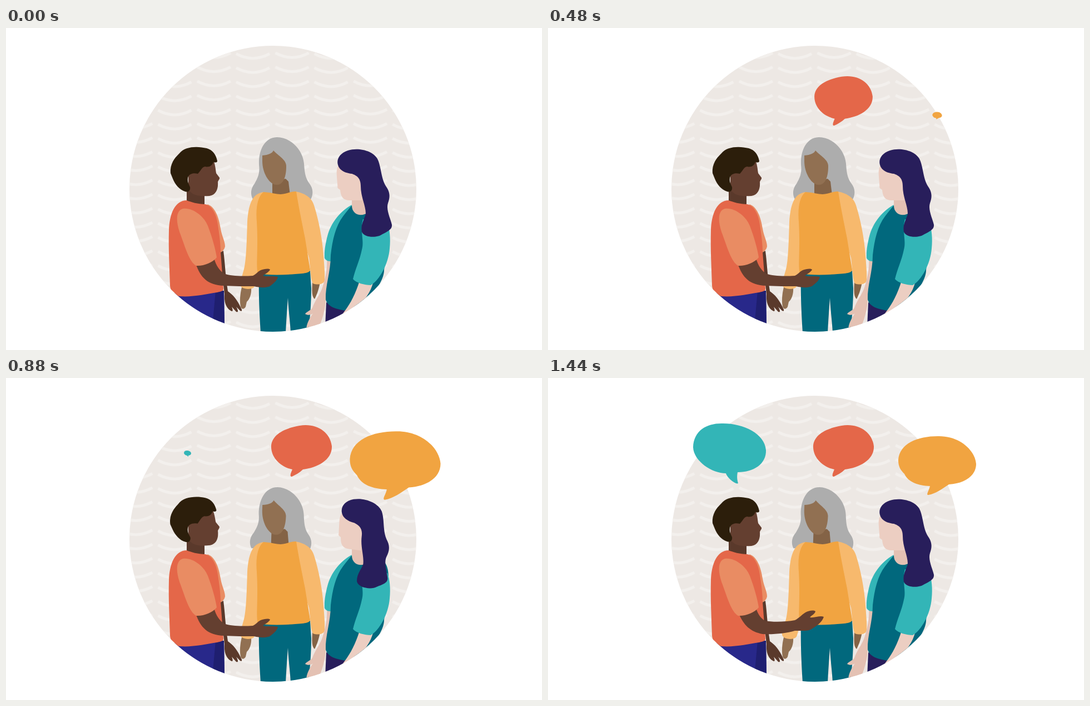
Animation, 964 px wide and 581 px high, one loop 6440 ms. Source, as an HTML page:

```html
<!DOCTYPE html>
<html lang="en">
<head>
<meta charset="utf-8">
<title>Conversation</title>
<style>
  html, body { margin: 0; width: 100%; height: 100%; overflow: hidden; background: #fff; }
  svg { display: block; width: 100%; height: 100%; }
  .red { fill: #e46749; }
  .peach { fill: #e98c63; }
  .amber { fill: #f1a441; }
  .light-amber { fill: #f7b96d; }
  .teal { fill: #33b5b7; }
  .petrol { fill: #01687d; }
  .navy { fill: #281e5b; }
  .brown { fill: #643f30; }
  .dark-brown { fill: #5a392b; }
  .tan { fill: #917052; }
  .dark-tan { fill: #846346; }
  .pink { fill: #eccec2; }
  .dark-pink { fill: #e4c1b3; }
</style>
</head>
<body>
<svg viewBox="0 0 964 581">
  <defs>
    <clipPath id="disc"><circle cx="480" cy="290" r="258"/></clipPath>
    <pattern id="waves" x="408.5" y="41" width="140.6" height="25.5" patternUnits="userSpaceOnUse">
      <g fill="none" stroke="#f3f0ed" stroke-width="5">
        <path d="M5.5 5.500Q35.500 22 65.500 5.500"/>
        <path d="M76 4Q106 20.500 136 4"/>
      </g>
    </pattern>
  </defs>

  <g clip-path="url(#disc)">
    <rect width="964" height="581" fill="#ede8e4"/>
    <rect width="964" height="581" fill="url(#waves)"/>

    <g id="middle-woman">
      <path class="tan" d="M424 468H441C442 480 438 490 433 494L431 503C428 508 424 508 422 503C420 492 421 480 424 468Z"/>
      <path class="dark-tan" d="M551 458H565C562 475 558 483 555 489C550 485 550 475 551 458Z"/>
      <path class="petrol" d="M455 438H547L549 470C549 500 546 530 544 550H512C511 530 508 510 507 487C506 500 504 530 503 550H458C456 520 454 480 455 438Z"/>
      <g id="middle-head">
        <path fill="#adadad" d="M487 197C512 197 534 220 536 245C537 262 539 272 546 281C553 290 553 302 547 311L500 306L444 309C438 298 442 287 447 281C453 270 457 262 455 247C454 222 464 198 487 197Z"/>
        <path class="dark-tan" d="M479 276L503 272L508 277L511 302H479Z"/>
        <path class="tan" d="M461 230C472 229 479 226 481 221C490 231 505 238 504 250C504 268 499 283 487 283C474 283 461 262 461 240Z"/>
      </g>
      <path class="light-amber" d="M464 296C442 298 436 320 434 350C433 385 432 420 428 435L421 460C420 466 424 470 435 471C444 471 447 468 448 464L458 430L465 320Z"/>
      <path class="light-amber" d="M520 295C535 297 550 305 554 320C562 345 569 380 571 410C572 425 574 445 573 456C571 463 560 464 552 461C548 455 548 440 545 415L515 320Z"/>
      <path class="amber" d="M463 296C480 297 485 300 494 300C505 300 512 294 522 295C525 315 531 345 538 380L547 436C547 441 540 443 520 444C495 446 470 446 453 443C449 430 454 400 451 350C449 325 452 305 463 296Z"/>
    </g>

    <g id="man">
      <path class="dark-brown" d="M384 405L391 402C394 425 395 450 398 468L399 475C408 481 416 490 424 508C425 512 421 511 419 508L414 503C417 508 419 514 414 512L406 503C408 508 409 513 404 510C396 505 392 495 393 480Z"/>
      <path fill="#28288a" d="M300 478L392 474L393 540H300Z"/>
      <path fill="#1f1f70" d="M377 474H392L393 540H371Z"/>
      <path class="dark-brown" d="M325 285H357V322H325Z"/>
      <path class="peach" d="M362 318C376 322 383 342 386 362C388 375 394 385 394 394C393 400 389 403 386 405L370 350Z"/>
      <path class="red" d="M325 311C332 314 346 318 358 318C371 320 379 338 381 355C384 375 386 390 386 404L391 470C392 474 388 475 380 477C360 480 335 486 312 484C300 482 296 474 295 465C294 430 292 400 293 365C294 335 304 311 325 311Z"/>
      <g id="man-head">
        <path class="brown" d="M328 262L345 248L374 241C377 250 377 257 378 262L384 270C385 273 381 275 381 278C382 290 378 301 366 303C350 304 333 303 328 290Z"/>
        <path fill="#2c1e0b" d="M296 262C294 243 307 231 312 226C322 213 345 213 361 217C372 220 378 229 380 240C380 243 376 243 373 242C371 248 366 252 358 250C352 251 350 258 345 263C337 261 328 263 327 271C326 278 329 282 331 287C332 294 327 297 322 295C312 292 304 282 300 272Z"/>
      </g>
      <path id="arm" class="brown"/>
      <path class="peach" d="M318 326C335 323 357 340 363 357C371 378 377 400 379 414C372 423 355 430 342 429C330 422 323 398 314 373C306 352 304 330 318 326Z"/>
    </g>

    <g id="right-woman">
      <path class="dark-pink" d="M577 415H587C584 440 577 460 575 490C574 510 568 530 560 545L540 545C540 535 545 525 552 515C548 518 543 519 538 516C540 512 548 510 551 505C555 492 566 480 570 465C574 450 578 440 577 415Z"/>
      <path class="navy" d="M576 495L614 505L590 540H574Z"/>
      <path class="teal" d="M622 319C608 326 587 345 579 372C574 390 572 405 573 415C575 420 580 421 586 421L606 370Z"/>
      <path class="dark-pink" d="M622 300H648V342H622Z"/>
      <path class="petrol" d="M622 320C622 335 635 340 645 336L670 325C685 330 688 345 688 360L680 437C680 450 670 470 650 490L612 510C595 508 578 503 575 490C574 465 584 440 584 410C587 382 593 357 606 340C612 332 617 326 622 320Z"/>
      <path class="pink" d="M636 456L660 460C655 480 640 500 606 528L600 522C614 506 626 488 636 456Z"/>
      <path class="teal" d="M642 345C636 365 645 385 640 400C636 420 628 435 624 453C630 460 645 464 656 464C672 455 688 425 690 398C692 380 690 362 686 352Z"/>
      <g id="right-head">
        <path class="pink" d="M600 246C595 250 594 258 595 268L596 282C597 285 595 288 598 290L601 292C602 305 607 311 618 311H641V250Z"/>
        <path class="navy" d="M597 247C594 237 600 226 615 221C635 215 660 222 668 236C675 250 674 270 683 285C691 296 691 305 687 316C683 328 692 345 694 355C695 364 684 368 677 372C668 379 645 379 640 368C637 355 645 345 647 335C647 320 638 305 638 285C638 270 630 266 622 263C612 262 600 258 597 247Z"/>
      </g>
    </g>
  </g>

  <path id="red-bubble" class="red" d="M477 122C479 102 500 91 528 86C558 81 583 97 586 123C587 148 560 162 534 165C528 171 520 175 514 178C509 178 513 170 515 165C492 160 476 142 477 122Z"/>
  <path id="amber-bubble" class="amber" d="M630 148C632 118 665 105 701 105C740 104 768 130 770 155C770 176 750 190 721 192C709 200 697 209 684 211C679 211 686 202 687 195C665 194 648 188 641 173C634 166 630 160 630 148Z"/>
  <path id="teal-bubble" class="teal" d="M261 125C262 95 285 82 312 82C350 81 390 100 392 130C393 155 370 170 341 170C339 180 341 186 342 190C338 193 322 180 320 172C295 172 262 150 261 125Z"/>
</svg>
<script>
const STEP = 80, LOOP = 6440, LAST_STEP = 18;
const el = id => document.getElementById(id);

// Linear interpolation through [step, value] keys, held at both ends.
function track(keys, x) {
  if (x <= keys[0][0]) return keys[0][1];
  for (let i = 1; i < keys.length; i++) {
    const [x0, a] = keys[i - 1], [x1, b] = keys[i];
    if (x <= x1) return a + (b - a) * (x - x0) / (x1 - x0);
  }
  return keys[keys.length - 1][1];
}

const pop = [[1, 0], [1.7, .09], [3.7, .31], [4, .39], [5, .61], [6, .96], [7, 1.165], [8, 1.12], [9, 1]];
const bubbles = [
  { id: 'red-bubble', delay: 0, x: 531.5, y: 131, rest: 1 },
  { id: 'amber-bubble', delay: 4, x: 700, y: 158, rest: 1 },
  { id: 'teal-bubble', delay: 9.2, x: 326.5, y: 136.5, rest: 1.024 }
];
const heads = [
  { id: 'man-head', pivot: '340 276', keys: [[9, 0], [11, -2.5], [13, -8], [15, -2.5], [17, 0]] },
  { id: 'middle-head', pivot: '490 235', keys: [[8, 0], [10, 2]] },
  { id: 'right-head', pivot: '637 299', keys: [[6, 0], [8, 3.8], [11, 7.3], [13, 3.8], [15, 0]] }
];

const armLow = 'M341 425C350 450 362 464 392 465C410 466 430 466 446 466C458 469 470 469 476 465C482 460 488 455 489 449C482 447 470 449 462 447C466 444 473 440 475 436C472 433 464 435 458 437C452 440 449 445 444 447C425 448 405 448 392 443C385 438 378 430 374 415Z';
const armHigh = 'M343 425C352 446 364 458 386 462C405 463 428 461 444 456C456 456 468 457 474 453C482 448 493 441 496 431C490 428 480 433 471 432C474 428 480 426 481 421C477 418 469 420 463 423C456 427 451 434 444 437C428 440 405 441 390 438C384 434 378 428 374 415Z';
const armKeys = [[11, 0], [13, .75], [15, 1]];

function blend(from, to, p) {
  const ends = to.match(/\d+/g);
  let i = 0;
  return from.replace(/\d+/g, n => +n + (ends[i++] - n) * p);
}

function draw(step) {
  for (const { id, delay, x, y, rest } of bubbles) {
    const s = track(pop, step - delay) / rest;
    el(id).setAttribute('transform', `translate(${x} ${y}) scale(${s}) translate(${-x} ${-y})`);
  }
  for (const { id, pivot, keys } of heads) {
    el(id).setAttribute('transform', `rotate(${track(keys, step)} ${pivot})`);
  }
  el('arm').setAttribute('d', blend(armLow, armHigh, track(armKeys, step)));
}

const start = performance.now();
function tick() {
  const t = (performance.now() - start) % LOOP;
  draw(Math.min(LAST_STEP, Math.floor(t / STEP)));
  requestAnimationFrame(tick);
}
tick();
</script>
</body>
</html>
```
